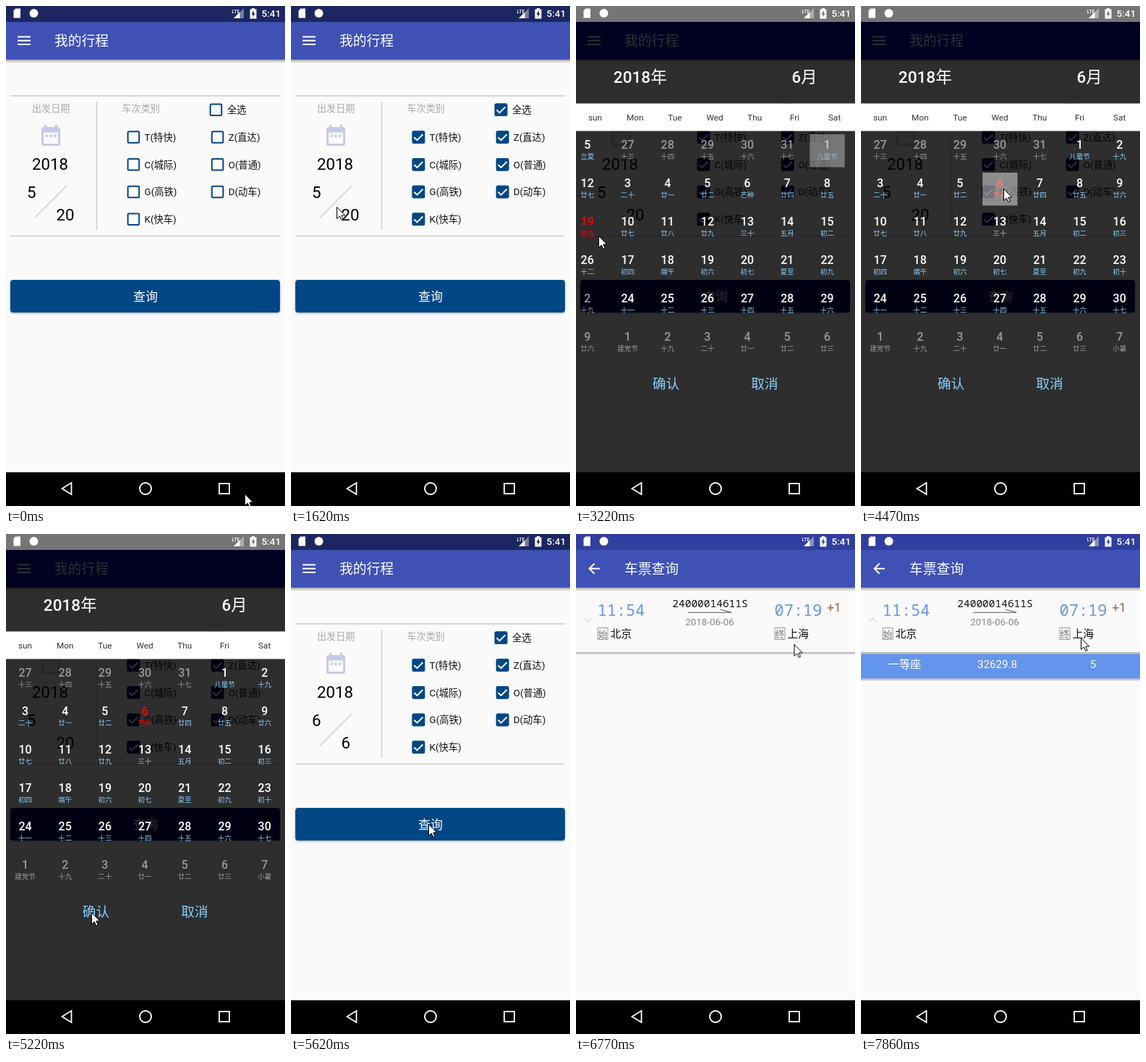
An HTML page that plays this animation: 386x690 px, repeating every 8000 ms.

```html
<!DOCTYPE html>
<html lang="zh-CN">
<head>
<meta charset="utf-8">
<title>我的行程</title>
<style>
html, body { margin: 0; width: 100%; height: 100%; overflow: hidden; background: #000; }
svg { display: block; width: 386px; height: 690px; font-family: Roboto, "Noto Sans CJK SC", "Noto Sans CJK", sans-serif; }
.mono { font-family: "Noto Sans Mono", "DejaVu Sans Mono", monospace; }
.raised { filter: drop-shadow(0 1.5px 1.5px rgba(0, 0, 0, .35)); }
.num { font-weight: 500; }
</style>
</head>
<body>
<script>
const LOOP = 8000, BLUE = '#004785', INDIGO = '#3f51b5', SKY = '#87cefa', CORN = '#6495ed', PAPER = '#fafafa';
const PAGE = 387; // distance between two calendar months

// ---- drawing helpers ----
const rect = (x, y, w, h, fill, more = '') =>
  `<rect x="${x}" y="${y}" width="${w}" height="${h}" fill="${fill}" ${more}/>`;
const path = (d, stroke, width = 1, more = '') =>
  `<path d="${d}" fill="none" stroke="${stroke}" stroke-width="${width}" ${more}/>`;
const shape = (d, fill, more = '') => `<path d="${d}" fill="${fill}" ${more}/>`;
const text = (s, x, y, size, fill, more = '') =>
  `<text x="${x}" y="${y}" font-size="${size}" fill="${fill}" ${more}>${s}</text>`;
const mid = (s, x, y, size, fill, more = '') =>
  text(s, x, y, size, fill, `text-anchor="middle" ${more}`);
const group = (id, body, more = '') => `<g id="${id}" ${more}>${body}</g>`;

// ---- shared chrome ----
const topBar = (title, statusFill, icon) =>
  rect(0, 0, 386, 22, statusFill) +
  rect(0, 74, 386, 5, 'url(#shade)') +
  rect(0, 22, 386, 52, INDIGO, 'class="bar"') +
  path(icon, '#fff', 2) +
  text(title, 67, 54.5, 18.75, '#fff');

const statusIcons =
  shape('M13 3.5H20V16.5H10.5V6.5Z', '#fff') +
  '<circle cx="38.5" cy="10" r="6" fill="#fff"/>' +
  text('LTE', 312.5, 9.5, 6.6, '#fff', 'font-weight="500"') +
  shape('M329 3V17H315Z', '#fff', 'opacity=".4"') +
  shape('M323.5 8.5V17H315Z', '#fff') +
  shape('M337.5 4.5H340V3H344V4.5H346.5V17.5H337.5ZM342.8 6L339.5 11.5H341.5V15.5L344.6 10H342.8Z', '#fff', 'fill-rule="evenodd"') +
  text('5:41', 353.5, 15, 13.5, '#fff', 'font-weight="500"');

const navBar = rect(0, 643.4, 386, 46.6, '#000') +
  path('M77.5 666L90.5 658V674Z', '#fff', 1.8) +
  '<circle cx="193" cy="666" r="8" fill="none" stroke="#fff" stroke-width="1.9"/>' +
  rect(295, 659, 14, 14, 'none', 'stroke="#fff" stroke-width="1.8"');

// ---- search page ----
const checkbox = (label, x, y, gap) =>
  rect(x - 7.8, y - 7.8, 15.6, 15.6, 'none', `rx="1.5" stroke="${BLUE}" stroke-width="2"`) +
  `<g class="tick">` +
  rect(x - 8.8, y - 8.8, 17.6, 17.6, BLUE, 'rx="2" class="blue"') +
  path(`M${x - 6} ${y + .2}l4 4l8-8`, '#fff', 2) + '</g>' +
  text(label, x + gap, y + 4.8, 13.3, '#111');

const trains = [['T(特快)', 'Z(直达)'], ['C(城际)', 'O(普通)'], ['G(高铁)', 'D(动车)'], ['K(快车)']];
const boxes = checkbox('全选', 290.5, 143.2, 15.5) + trains.map((row, r) =>
  row.map((s, c) => checkbox(s, 176.4 + 116.2 * c, 181 + 37.75 * r, 15.2)).join('')).join('');

const dateIcon =
  shape('M52 167H72a3 3 0 0 1 3 3V190a3 3 0 0 1-3 3H52a3 3 0 0 1-3-3V170a3 3 0 0 1 3-3ZM52 174.5V190H72V174.5Z', '#c5cae9', 'fill-rule="evenodd"') +
  [53, 67.5].map(x => rect(x, 164, 3.5, 4, '#c5cae9')).join('') +
  [54.5, 60.3, 66.1].map(x => rect(x, 177.5, 3.4, 3.4, '#c5cae9')).join('');

const picked = (id, m, d) => group(id, text(m, 29, 264.5, 22.3, '#000') + text(d, 69.5, 296, 22.3, '#000'));

const searchPage =
  rect(0, 22, 386, 622, PAPER) +
  topBar('我的行程', '#1c2660', 'M16 42.5H34M16 47.7H34M16 52.9H34') +
  path('M6 124H379M6 317.5H379M125.5 132V309', '#ccc', 1.4) +
  text('出发日期', 36, 146, 13.1, '#aaa') + text('车次类别', 160.5, 146, 13.1, '#aaa') +
  dateIcon + mid('2018', 61, 226, 22.3, '#000') +
  picked('before', 5, 20) + picked('after', 6, 6) +
  path('M40 292L84 248', '#ccc', 1.5) + boxes +
  `<g class="raised">${rect(6, 378, 373, 45, BLUE, 'rx="4" class="blue"')}</g>` +
  mid('查询', 193, 407.3, 17, '#fff');

// ---- calendar dialog ----
const festivals = { '5-1': '劳动节', '5-4': '青年节', '5-5': '立夏', '5-21': '小满', '6-1': '儿童节',
  '6-6': '芒种', '6-18': '端午', '6-21': '夏至', '7-1': '建党节', '7-7': '小暑' };
const digits = '一二三四五六七八九十';

// Lunar label for the k-th day after 29 April 2018
function lunar(k) {
  let n = 14 + k, month = '';
  if (n > 29) { n -= 29; month = '四月'; }
  if (n > 30 && month) { n -= 30; month = '五月'; }
  if (n === 1) return month;
  if (n === 20) return '二十';
  if (n === 30) return '三十';
  return ['初', '十', '廿'][n > 10 ? Math.floor(n / 10) : 0] + digits[(n - 1) % 10];
}

const colX = c => 26.5 + 55.2 * c;
const glow = (id, c, r, fill) => rect(colX(c) - 24, 177 + 53 * r, 48.4, 45.4, fill, `id="${id}"`);

function monthPage(month, first, shift) {
  let out = '';
  for (let i = 0; i < 42; i++) {
    const k = first + i, date = new Date(2018, 3, 29 + k);
    const m = date.getMonth() + 1, d = date.getDate(), key = m + '-' + d;
    const x = colX(i % 7), y = 53 * Math.floor(i / 7);
    const inside = m === month, today = inside && key === '5-19';
    const cls = inside && key === '6-6' ? ' chosen' : '';
    out += mid(d, x, 197.3 + y, 16, today ? 'red' : inside ? '#fff' : '#999', `class="num${cls}"`) +
      mid(festivals[key] || lunar(k), x, 211.3 + y, 9.5, today ? 'red' : inside ? SKY : '#999', `class="${cls}"`);
  }
  return `<g transform="translate(${shift})">${out}</g>`;
}

const monthLabel = (id, n) => group(id, mid(`<tspan font-weight="500">${n}</tspan>月`, 316, 106, 22.3, '#fff'));

const dialog =
  rect(0, 0, 386, 644, '#000', 'opacity=".815"') + rect(0, 0, 386, 22, '#757575') +
  mid('<tspan font-weight="500">2018</tspan>年', 88.8, 106, 22.6, '#fff') +
  monthLabel('may', 5) + monthLabel('june', 6) +
  rect(0, 134.5, 386, 38, '#fff') +
  ['sun', 'Mon', 'Tue', 'Wed', 'Thu', 'Fri', 'Sat'].map((s, c) => mid(s, colX(c), 158, 11.8, '#333')).join('') +
  group('pages', monthPage(5, 0, 0) + monthPage(6, 28, PAGE) +
    `<g transform="translate(${PAGE})">${glow('glowA', 5, 0, 'rgba(165,165,165,.6)')}${glow('glowB', 3, 1, 'rgba(255,255,255,.45)')}</g>`) +
  mid('确认', 124.5, 527.5, 18.7, SKY) + mid('取消', 261, 527.5, 18.7, SKY);

// ---- result page ----
const stop = (x, time, tag, city) =>
  text(time, x, 113, 22, CORN, 'class="mono"') +
  rect(x + .5, 129.5, 14, 16, 'none', 'stroke="#a39a96"') +
  mid(tag, x + 7.5, 142.5, 13, '#777') + text(city, x + 18, 143.3, 14.8, '#111');

const resultPage =
  rect(0, 22, 386, 622, PAPER) +
  group('seat', rect(0, 199.5, 386, 4, 'url(#shade)') + rect(0, 165.3, 386, 34.2, CORN) +
    mid('一等座', 60.5, 185, 15.2, '#fff') + mid('32629.8', 188.5, 184.8, 15.2, '#fff') + mid('5', 321, 184.8, 15.2, '#fff')) +
  rect(0, 74, 386, 91.3, PAPER) + rect(0, 163, 386, 4, 'url(#shade)') +
  topBar('车票查询', '#303f9f', 'M33 47.7H19M25.5 40.7L18.5 47.7L25.5 54.7') +
  group('fold', path('M11 116L16 121L21 116', '#ddd', 1.6)) +
  group('unfold', path('M11 121L16 116L21 121', '#ddd', 1.6)) +
  stop(29.5, '11:54', '始', '北京') + stop(274.5, '07:19', '终', '上海') +
  mid('24000014611S', 185.5, 100.5, 14.5, '#111', 'class="mono"') +
  path('M155 108.3H215L200 104.3', '#555', 1) +
  mid('2018-06-06', 185, 126, 13.4, '#888') +
  text('+1', 347.5, 106.5, 17, '#9c7c64', 'font-weight="500"');

const cursor = '<path d="M.5.5V16.5L4.3 13L6.8 18.5L9.2 17.5L6.800 12H11.7Z" fill="#fff" stroke="#000" stroke-width="1"/>';

document.body.innerHTML = `<svg viewBox="0 0 386 690">
<defs><linearGradient id="shade" x2="0" y2="1"><stop stop-opacity=".32"/><stop offset="1" stop-opacity="0"/></linearGradient></defs>
${searchPage}${rect(0, 0, 386, 644, '#000', 'id="dim"')}${group('dialog', dialog)}
${group('result', resultPage)}${statusIcons}${navBar}${group('cursor', cursor)}</svg>`;

// ---- motion: [time in ms, declarations] turned into looping keyframes ----
let css = '', count = 0;
function track(target, ease, points) {
  const name = 'k' + count++;
  const all = points[0][0] ? [[0, points[0][1]], ...points] : points.slice();
  all.push([LOOP, all[all.length - 1][1]]);
  css += `@keyframes ${name}{${all.map(([t, v]) => `${t / LOOP * 100}%{${v}}`).join('')}}
${target}{animation:${name} ${LOOP}ms ${ease} infinite}`;
}
const fade = (target, pts, ease = 'linear') => track(target, ease, pts.map(([t, o]) => [t, `opacity:${o}`]));
const swap = (off, on, t) => {
  fade(off, [[0, 1], [t, 0]], 'step-end');
  fade(on, [[0, 0], [t, 1]], 'step-end');
};
const move = (x, y) => `transform:translate(${x}px,${y}px)`;

fade('.tick', [[1070, 0], [1200, 1]]);
fade('#dialog', [[1850, 0], [2080, 1], [5300, 1], [5480, 0]]);
swap('#may', '#june', 3150);
swap('#before', '#after', 5310);
swap('#fold', '#unfold', 7230);
fade('#glowA', [[3140, 0], [3150, 1], [3350, 1], [3600, 0]]);
fade('#glowB', [[4460, 0], [4470, 1], [4560, 1], [4800, 0]]);
fade('#dim', [[6270, 0], [6310, .05], [6480, .3], [6850, .3], [6860, 0]]);
css += `@keyframes choose{${4465 / LOOP * 100}%,100%{fill:red}}
.chosen{animation:choose ${LOOP}ms step-end infinite}`;

// Behind the dialog, coloured areas lose all but their blue
const deepen = (target, day, night) => track(target, 'linear',
  [[1850, day], [2080, night], [5300, night], [5480, day]].map(([t, c]) => [t, `fill:${c}`]));
deepen('.bar', INDIGO, '#0000b5');
deepen('.blue', BLUE, '#000068');

track('#pages', 'linear', [[2840, 0], [2930, -55], [3050, -185], [3150, -285], [3220, -341.7],
  [3300, -371], [3380, -383], [3480, -PAGE]].map(([t, x]) => [t, move(x, 0)]));
track('#result', 'linear', [[6320, 'opacity:0;' + move(0, 51)], [6400, 'opacity:.4;' + move(0, 26)],
  [6500, 'opacity:.9;' + move(0, 8)], [6560, 'opacity:1;' + move(0, 3)], [6670, 'opacity:1;' + move(0, 0)]]);
track('#seat', 'ease-out', [[7220, move(0, -40)], [7500, move(0, 0)]]);
track('#cursor', 'ease-in-out', [[0, 330, 673], [70, 330, 673], [350, 355, 430], [760, 294, 145], [1180, 294, 145],
  [1610, 63, 277], [2050, 63, 277], [2610, 342, 306], [2690, 342, 308], [2840, 342, 308], [3180, 31, 317],
  [3300, 31, 317], [3610, 262, 240], [3700, 262, 240], [4070, 198, 252], [4220, 197, 252], [4600, 197, 252],
  [5200, 118, 522], [5330, 118, 522], [5610, 190, 400], [6080, 190, 400], [6310, 245, 305], [6850, 304, 145],
  [7000, 304, 143]].map(([t, x, y]) => [t, move(x, y)]));

document.head.appendChild(document.createElement('style')).textContent = css;
</script>
</body>
</html>
```
